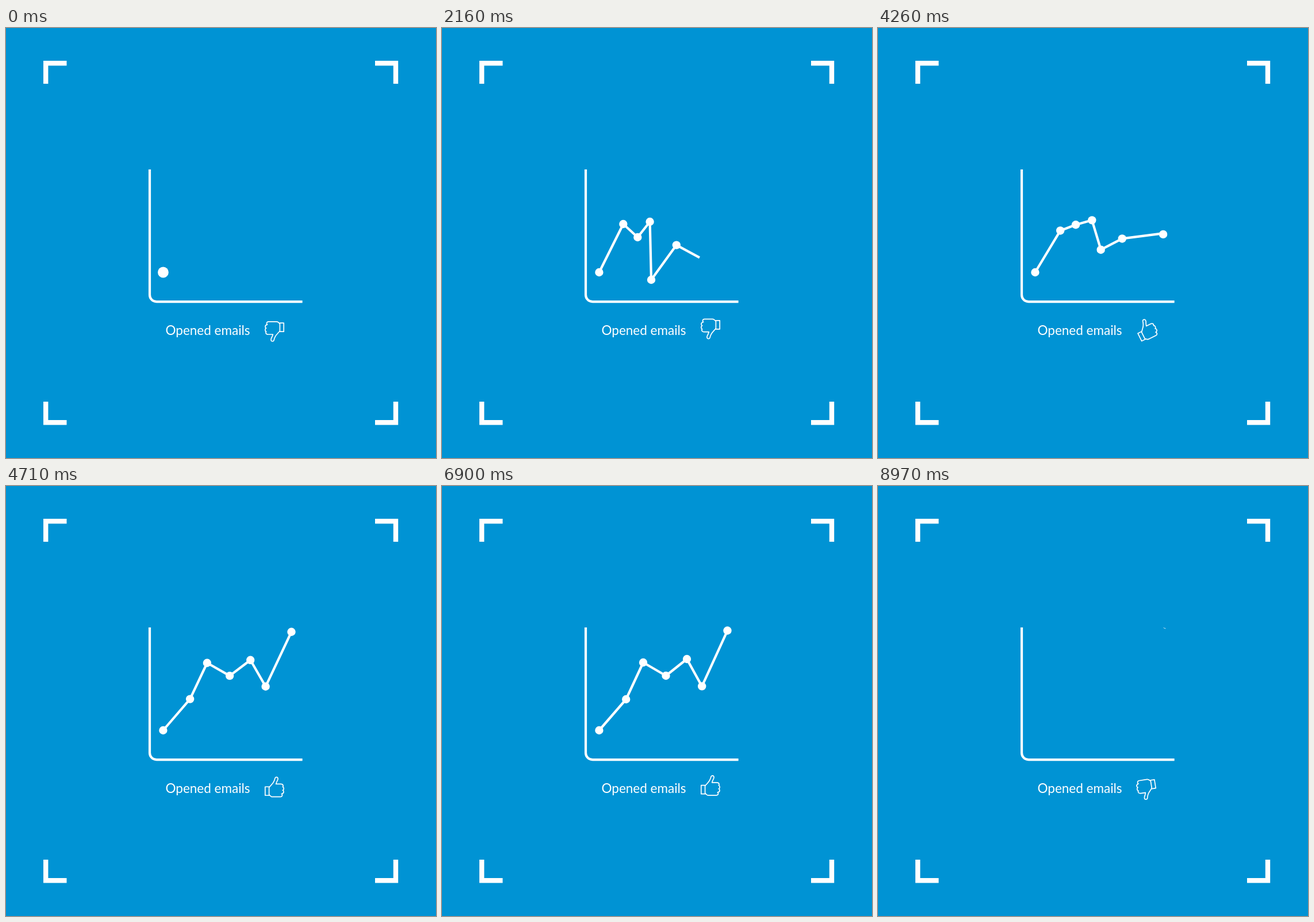
Write an HTML page that moves like this. It is 748 px wide and 748 px high and loops after 9000 ms.

```html
<!DOCTYPE html>
<html lang="en">
<head>
<meta charset="utf-8">
<title>Opened emails</title>
<style>
  html, body { margin: 0; width: 100%; height: 100%; overflow: hidden; background: #0093d4; }
  svg { display: block; width: 100vw; height: 100vh; }
  .stroke { fill: none; stroke: #fff; }
  text { font: 22.5px Lato, "Open Sans", sans-serif; fill: #fff; }
</style>
</head>
<body>
<svg viewBox="0 0 748 748">
  <path class="stroke" stroke-width="8.4" d="M69.2 97V61.2H105.5M642 61.2H678V97M69.2 650V686.2H105.5M642 686.2H678V650"/>
  <path class="stroke" stroke-width="4.2" d="M250 246V464A12 12 0 0 0 262 476.2H515.6"/>
  <path id="line" class="stroke" stroke-width="4.2" stroke-linejoin="round" pathLength="1"/>
  <g id="dots" fill="#fff"></g>
  <text x="277.5" y="533.5">Opened emails</text>
  <g id="thumb" class="stroke" stroke-width="1.7" stroke-linejoin="round">
    <path d="M476.4 513.2H483.2V528.2H476.4Z"/>
    <path d="M476.4 514.3L473 511.5Q472 510.8 470.5 510.8H457Q453.5 510.8 453.5 514Q453.5 515.2 454.6 515.9
      Q451 516.5 451 519.4Q451 521.4 452.6 522.1Q450.8 523 450.8 525.2Q450.8 527.4 452.6 528.1
      Q451.7 529 452 530.5Q452.6 533 456 533H464.3Q463.2 537 461.4 540Q460 544.6 463.5 545
      Q465.6 545 466.1 543Q467.5 536.4 472 532Q475 528.4 476.4 527.4"/>
  </g>
</svg>
<script>
const LOOP = 9000, BOB = LOOP / 11, DOT = 7.2, PEAK = 10.8;

const falling = [[273.4, 425], [315.3, 341], [340.3, 364], [361.6, 337], [364, 438], [407.8, 377.6], [495.8, 425.2]];
const rising = [[273.4, 425], [320.2, 371], [350, 307], [389.5, 330], [426, 301], [452.2, 348.4], [496.5, 251.5]];
const risingEnd = [498.6, 247];

const showAt = [-95, 180, 260, 390, 985, 1690, 3580];
const hideAt = [7460, 7740, 7920, 8020, 8140, 8270, 8740];

const line = document.getElementById("line");
const thumb = document.getElementById("thumb");
const dots = falling.map(() => document.getElementById("dots")
  .appendChild(document.createElementNS("http://www.w3.org/2000/svg", "circle")));

const part = (t, from, to) => Math.min(1, Math.max(0, (t - from) / (to - from)));
const mix = (a, b, p) => a + (b - a) * p;
const mixPoint = (a, b, p) => [mix(a[0], b[0], p), mix(a[1], b[1], p)];
const easeOut = p => 1 - (1 - p) ** 2;
const inOut = n => p => p < .5 ? (2 * p) ** n / 2 : 1 - (2 - 2 * p) ** n / 2;
const quad = inOut(2), cubic = inOut(3);

function bezier(x1, y1, x2, y2) {
  const at = (a, b, u) => 3 * (1 - u) ** 2 * u * a + 3 * (1 - u) * u * u * b + u ** 3;
  return x => {
    if (x <= 0 || x >= 1) return x;
    let lo = 0, hi = 1;
    for (let i = 0; i < 30; i++) {
      const mid = (lo + hi) / 2;
      if (at(x1, x2, mid) < x) lo = mid; else hi = mid;
    }
    return at(y1, y2, lo);
  };
}
const drawEase = bezier(0, .6, .7, 1);

// Dots pop in past their size, and swell briefly before they vanish.
function radius(t, show, hide) {
  if (t < show + 150) return PEAK * easeOut(part(t, show, show + 150));
  if (t < hide) return mix(PEAK, DOT, quad(part(t, show + 150, show + 330)));
  if (t < hide + 90) return mix(DOT, PEAK, easeOut(part(t, hide, hide + 90)));
  return PEAK * (1 - part(t, hide + 90, hide + 220) ** 2);
}

function render(t) {
  const morph = cubic(part(t, 3740, 4880));
  const points = falling.map((p, i) => mixPoint(p, rising[i], morph));
  const path = [...points.slice(0, -1), mixPoint(falling[6], risingEnd, morph)];
  const end = drawEase(part(t, 60, 3500));
  const start = quad(part(t, 7460, 9020));

  line.setAttribute("d", "M" + path.map(p => p.join(" ")).join("L"));
  line.style.display = end > start ? "" : "none";
  line.setAttribute("stroke-dasharray", `${end - start} 2`);
  line.setAttribute("stroke-dashoffset", -start);

  dots.forEach((dot, i) => {
    dot.setAttribute("cx", points[i][0]);
    dot.setAttribute("cy", points[i][1]);
    dot.setAttribute("r", radius(t, showAt[i], hideAt[i]));
  });

  const bob = 2.7 * (Math.cos(2 * Math.PI * t / BOB) - 1);
  const turn = 180 * (part(t, 3750, 4350) + part(t, 8430, 9000));
  thumb.setAttribute("transform", `translate(0 ${bob}) rotate(${turn} 467 527)`);
}

const begin = performance.now();
function tick() {
  render((performance.now() - begin) % LOOP);
  requestAnimationFrame(tick);
}
tick();
</script>
</body>
</html>
```
